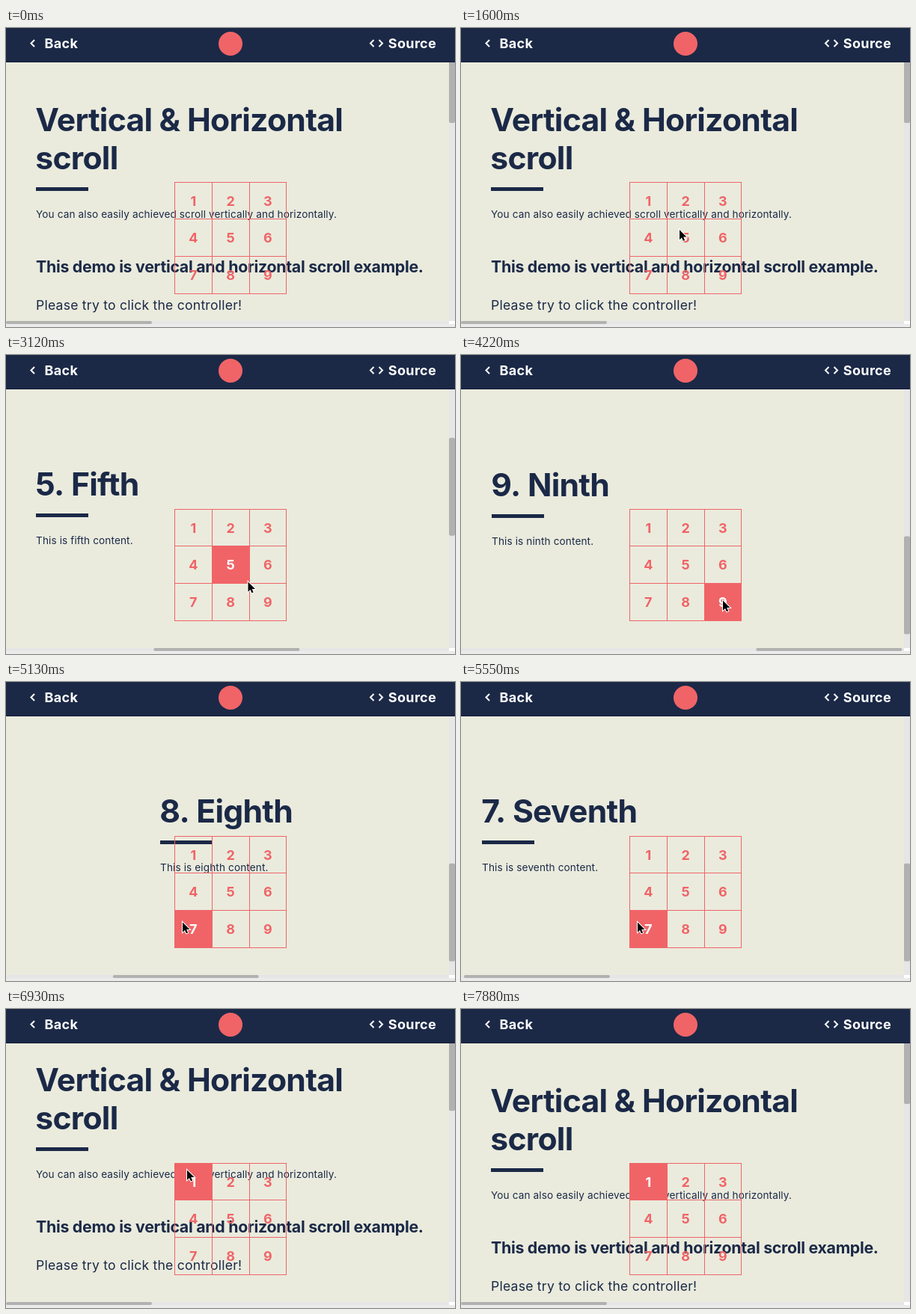
An HTML page with a canvas that plays this animation: 600 by 400 pixels, repeating every 8.75 s.

```html
<!DOCTYPE html>
<html lang="en">
<head>
<meta charset="utf-8">
<title>Vertical &amp; Horizontal scroll</title>
<style>
  html, body { margin: 0; width: 100%; height: 100%; overflow: hidden; }
  canvas { display: block; width: 600px; height: 400px; }
</style>
</head>
<body>
<canvas id="stage" width="600" height="400"></canvas>
<script>
const ctx = document.getElementById('stage').getContext('2d');
const LOOP = 8750, SCROLL_MS = 1000;
const NAVY = '#1b2947', PAPER = '#eaebdd', RED = '#f06467';
const THUMB = '#b1b1b1', TRACK = '#e6e6e6';
const ROW_Y = [0, 348, 748];
const GRID_X = [225, 275, 325, 374], GRID_Y = [206, 255, 305, 355];
const NAMES = ['First', 'Second', 'Third', 'Fourth', 'Fifth', 'Sixth', 'Seventh', 'Eighth', 'Ninth'];

// Each tap highlights a cell, then starts a scroll to its panel.
const TAPS = [
  { cell: 5, down: 2220, up: 2260 },
  { cell: 9, down: 3440, up: 3500 },
  { cell: 7, down: 4850, up: 4947 },
  { cell: 1, down: 6410, up: 6450 }
];

// Pointer moves: start, end, x and y reached.
const POINTER = [
  [0, 0, 190, 402],
  [850, 1600, 291.5, 269.5],
  [1770, 1930, 296, 271],
  [2800, 3120, 323, 303],
  [3120, 3400, 349.5, 328],
  [4290, 4840, 235.5, 321],
  [5845, 6170, 241.5, 215],
  [7420, 7880, 309, 402]
];

const clamp = v => Math.min(1, Math.max(0, v));
const smooth = v => v * v * (3 - 2 * v);
const easeOut = v => 1 - (1 - v) ** 5;
const colOf = cell => (cell - 1) % 3;
const rowOf = cell => Math.floor((cell - 1) / 3);

function rect(x, y, w, h, color, radius = 0) {
  ctx.fillStyle = color;
  ctx.beginPath();
  ctx.roundRect(x, y, w, h, radius);
  ctx.fill();
}

function text(str, x, y, size, { weight = 400, spacing = 0, color = NAVY, align = 'left' } = {}) {
  ctx.font = `${weight} ${size}px Inter, sans-serif`;
  ctx.letterSpacing = spacing + 'px';
  ctx.textAlign = align;
  ctx.fillStyle = color;
  ctx.fillText(str, x, y);
}

const title = (str, x, y) => text(str, x - 0.7, y, 42.67, { weight: 700, spacing: -0.74 });
const small = (str, x, y) => text(str, x, y, 13.6, { spacing: 0.115 });

function chevron(x, y, dx) {
  ctx.strokeStyle = '#fff';
  ctx.lineWidth = 2;
  ctx.beginPath();
  ctx.moveTo(x - dx, y - 4.5);
  ctx.lineTo(x, y);
  ctx.lineTo(x - dx, y + 4.5);
  ctx.stroke();
}

function scrollAt(t) {
  let x = 0, y = 0;
  for (const { cell, up } of TAPS) {
    const k = easeOut(clamp((t - up) / SCROLL_MS));
    x += (600 * colOf(cell) - x) * k;
    y += (ROW_Y[rowOf(cell)] - y) * k;
  }
  return [x, y];
}

function drawIntro(x, y) {
  title('Vertical & Horizontal', x, y + 138);
  title('scroll', x, y + 189);
  rect(x, y + 213, 70, 5, NAVY);
  small('You can also easily achieved scroll vertically and horizontally.', x, y + 254);
  text('This demo is vertical and horizontal scroll example.', x, y + 327, 21.33,
    { weight: 700, spacing: -0.29 });
  text('Please try to click the controller!', x, y + 377, 17.6, { spacing: 0.22 });
}

function drawPanels(sx, sy) {
  NAMES.forEach((name, i) => {
    const x = 40 + 600 * (i % 3) - sx;
    const row = Math.floor(i / 3);
    const y = ROW_Y[row] - sy;
    if (i === 0) return drawIntro(x, y);
    const top = row ? y : y - 51;
    title(`${i + 1}. ${name}`, x, top + 188);
    rect(x, top + 212, 70, 5, NAVY);
    small(`This is ${name.toLowerCase()} content.`, x, top + 253);
  });
}

function drawBars(sx, sy) {
  rect(592, 46, 8, 346, TRACK);
  rect(592, -4 + sy * 0.33, 8, 131, THUMB, 2);
  rect(0, 392, 592, 4, TRACK);
  rect(sx * 592 / 1800, 392, 195, 4, THUMB, 2);
  rect(592, 392, 8, 4, '#fff');
  rect(0, 396, 600, 4, '#ebebeb');
}

function drawHeader() {
  rect(0, 0, 600, 46, NAVY);
  rect(0, 44, 600, 2, '#1a2342');
  const label = { weight: 700, spacing: 0.35, color: '#fff' };
  chevron(33.5, 20.5, -4.5);
  text('Back', 51.5, 27, 18, label);
  chevron(487, 20.5, -4.5);
  chevron(503, 20.5, 4.5);
  text('Source', 510.8, 27, 18, label);
  rect(284, 5, 32, 32, RED, 16);
}

function fillCell(cell, color) {
  const c = colOf(cell), r = rowOf(cell);
  rect(GRID_X[c], GRID_Y[r], GRID_X[c + 1] - GRID_X[c] + 1, GRID_Y[r + 1] - GRID_Y[r] + 1, color);
}

function drawController(t) {
  const active = TAPS.filter(tap => t >= tap.up).pop()?.cell;
  const pressed = TAPS.find(tap => t >= tap.down && t < tap.up + 10)?.cell;
  GRID_X.forEach(x => rect(x, 206, 1, 150, RED));
  GRID_Y.forEach(y => rect(225, y, 150, 1, RED));
  if (active) fillCell(active, RED);
  for (let n = 1; n <= 9; n++) {
    text(n, 250.3 + 49.8 * colOf(n), [238, 287, 337][rowOf(n)], 18,
      { weight: 700, color: n === active ? '#fff' : RED, align: 'center' });
  }
  if (pressed && pressed !== active) fillCell(pressed, 'rgba(51, 181, 229, 0.4)');
}

const ARROW = new Path2D('M0 0V13.2L3 10.4L5 14.8L7.1 13.9L5.2 9.6H9.5Z');

function drawPointer(t) {
  let x = 0, y = 0;
  for (const [start, end, px, py] of POINTER) {
    const k = end ? smooth(clamp((t - start) / (end - start))) : 1;
    x += (px - x) * k;
    y += (py - y) * k;
  }
  if (y > 400) return;
  ctx.save();
  ctx.translate(x + 0.5, y + 0.5);
  ctx.strokeStyle = '#fff';
  ctx.lineWidth = 2;
  ctx.stroke(ARROW);
  ctx.fillStyle = '#000';
  ctx.fill(ARROW);
  ctx.restore();
}

function draw(t) {
  const [sx, sy] = scrollAt(t).map(Math.round);
  rect(0, 0, 600, 400, PAPER);
  drawPanels(sx, sy);
  drawController(t);
  drawBars(sx, sy);
  drawHeader();
  drawPointer(t);
}

const begin = performance.now();
function tick() {
  draw((performance.now() - begin) % LOOP);
  requestAnimationFrame(tick);
}
tick();
</script>
</body>
</html>
```
